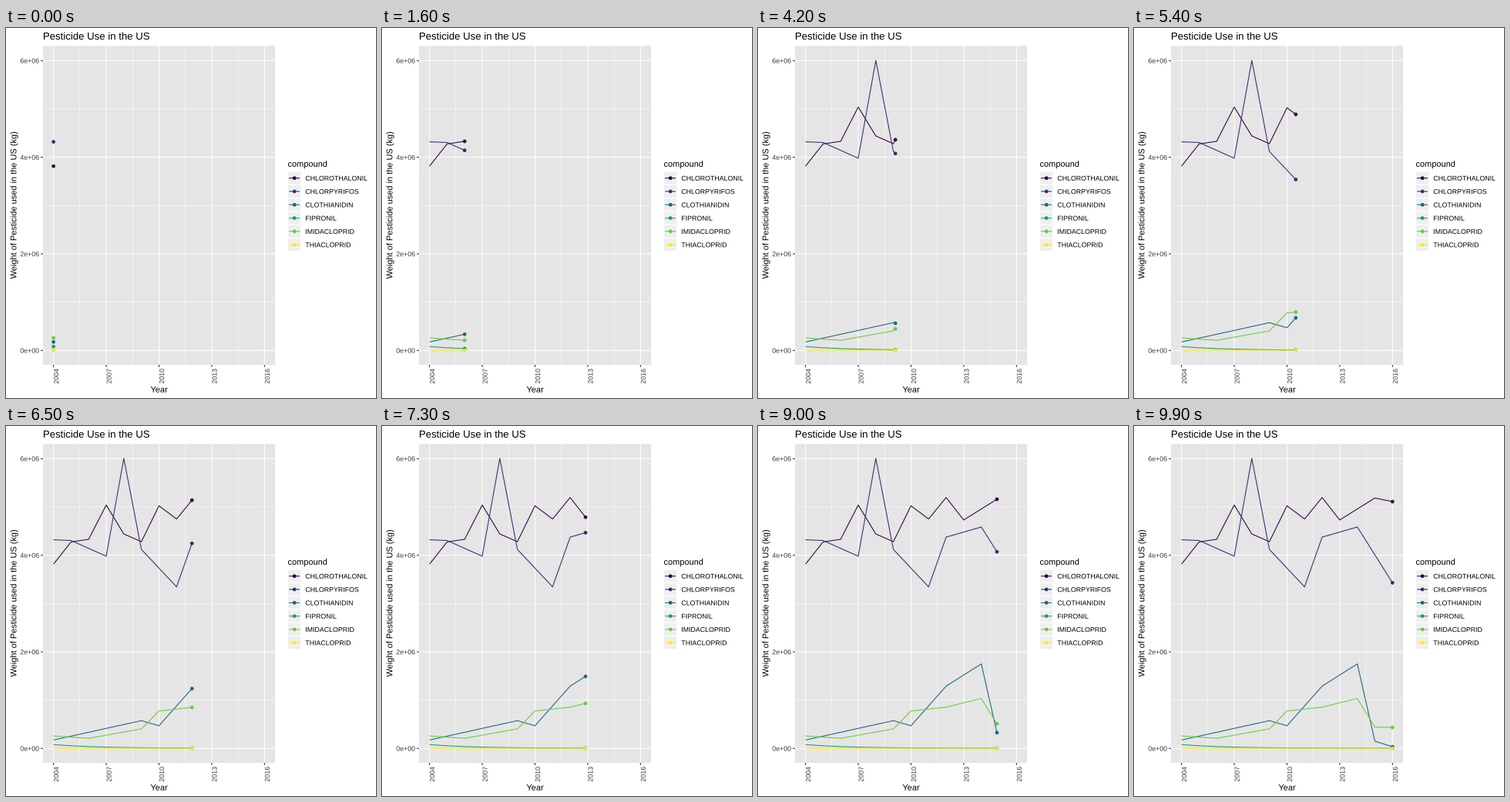
Animation, 480 px wide and 480 px high, one loop 10 s. Source, as a matplotlib script:

```python
import numpy as np
import matplotlib.pyplot as plt
from matplotlib.animation import FuncAnimation
from matplotlib.patches import Circle, PathPatch, Rectangle
from matplotlib.textpath import TextPath
from matplotlib.transforms import Affine2D

plt.rcParams["font.family"] = "Liberation Sans"

SIZE, DPI, FRAMES = 480, 72, 100
LINE = 1.07
TICK, LABEL = "#3b3b3b", "#242424"
LEFT, RIGHT, TOP, BOTTOM = 47.9, 349.1, 23.2, 437.1

YEARS = np.arange(13)
# Every year is reached on a whole frame
ARRIVALS = np.round(YEARS * (FRAMES - 1) / 12)


def bends(*points):
    """Yearly values on straight runs between turning points."""
    return np.interp(YEARS, *zip(*points))


# Millions of kg, by years since 2004
SERIES = {
    "CHLOROTHALONIL": ("#330042", bends(
        (0, 3.815), (1, 4.275), (2, 4.33), (3, 5.04), (4, 4.44), (5, 4.28),
        (6, 5.025), (7, 4.75), (8, 5.195), (9, 4.73), (11, 5.185), (12, 5.11))),
    "CHLORPYRIFOS": ("#312f74", bends(
        (0, 4.32), (1, 4.305), (3, 3.98), (4, 6.005), (5, 4.12), (7, 3.345),
        (8, 4.375), (10, 4.585), (12, 3.43))),
    "CLOTHIANIDIN": ("#1f657f", bends(
        (0, .175), (5, .575), (6, .47), (8, 1.29), (10, 1.75), (11, .15),
        (12, .035))),
    "FIPRONIL": ("#1a9d74", .004 + .076 * np.exp(-YEARS / 2.5)),
    "IMIDACLOPRID": ("#67cc40", bends(
        (0, .26), (2, .21), (5, .405), (6, .775), (8, .855), (10, 1.035),
        (11, .445), (12, .435))),
    "THIACLOPRID": ("#fce51e", np.full(13, .003)),
}


def px(year):
    return 61.6 + 22.81 * year


def py(value):
    return 418.3 - 62.66 * value


fig = plt.figure(figsize=(SIZE / DPI, SIZE / DPI), dpi=DPI, facecolor="white")
ax = fig.add_axes([0, 0, 1, 1])
ax.set(xlim=(0, SIZE), ylim=(SIZE, 0))
ax.axis("off")


def line(xs, ys, color, width=LINE, z=2):
    return ax.plot(xs, ys, color=color, lw=width, zorder=z, snap=False,
                   solid_capstyle="butt", solid_joinstyle="round")[0]


def dot(x, y, color):
    return ax.add_patch(Circle((x, y), 2.35, fc=color, lw=0, zorder=4))


def box(x, y, w, h, **style):
    ax.add_patch(Rectangle((x, y), w, h, zorder=1, snap=False, **style))


def text(x, y, s, size, color="black", align=0, angle=0):
    """Text as outlines, so letters keep their exact spacing.

    align: 0 left, 0.5 centre, 1 right
    """
    path = TextPath((0, 0), s, size=size)
    place = (Affine2D().translate(-align * path.get_extents().x1, 0)
             .scale(1, -1).rotate_deg(-angle).translate(x, y))
    ax.add_patch(PathPatch(path, fc=color, lw=0, snap=False, zorder=5,
                           transform=place + ax.transData))


def draw_panel():
    box(LEFT, TOP, RIGHT - LEFT, BOTTOM - TOP, fc="#e5e5e5", lw=0)
    for year in np.arange(0, 12.1, 1.5):
        major = year % 3 == 0
        x = px(year)
        line([x, x], [TOP, BOTTOM], "white", LINE if major else LINE / 2)
        if major:
            line([x, x], [BOTTOM, BOTTOM + 2.75], LABEL)
            text(x + 6.6, 442.3, f"{2004 + year:.0f}", 8.8, TICK, 1, 90)
    for value in range(7):
        major = value % 2 == 0
        y = py(value)
        line([LEFT, RIGHT], [y, y], "white", LINE if major else LINE / 2)
        if major:
            line([LEFT - 2.75, LEFT], [y, y], LABEL)
            text(42.7, y + 3.2, f"{value * 1e6:.0e}", 8.8, TICK, 1)
    text(LEFT, 15, "Pesticide Use in the US", 13.2)
    text(198.5, 472.6, "Year", 11, align=.5)
    text(13.4, 230.2, "Weight of Pesticide used in the US (kg)", 11,
         align=.5, angle=90)


def draw_legend():
    key, x = 17.28, 365.5
    text(x, 180, "compound", 11)
    for i, (name, (color, _)) in enumerate(SERIES.items()):
        y = 186.1 + i * key
        mid = y + key / 2
        box(x, y, key, key, fc="#efefef", ec="white", lw=LINE)
        line([x + key * .1, x + key * .9], [mid, mid], color)
        dot(x + key / 2, mid, color)
        text(388.3, mid + 3.2, name, 8.8)


draw_panel()
draw_legend()
tracks = [(line([], [], color, z=3), dot(0, 0, color), values)
          for color, values in SERIES.values()]


def update(frame):
    now = np.interp(frame, ARRIVALS, YEARS)
    past = YEARS[YEARS < now]
    artists = []
    for path, head, values in tracks:
        x, y = px(now), py(np.interp(now, YEARS, values))
        path.set_data(np.append(px(past), x), np.append(py(values[past]), y))
        head.center = x, y
        artists += [path, head]
    return artists


anim = FuncAnimation(fig, update, frames=FRAMES, interval=100,
                     repeat=True, repeat_delay=0)
plt.show()
```
